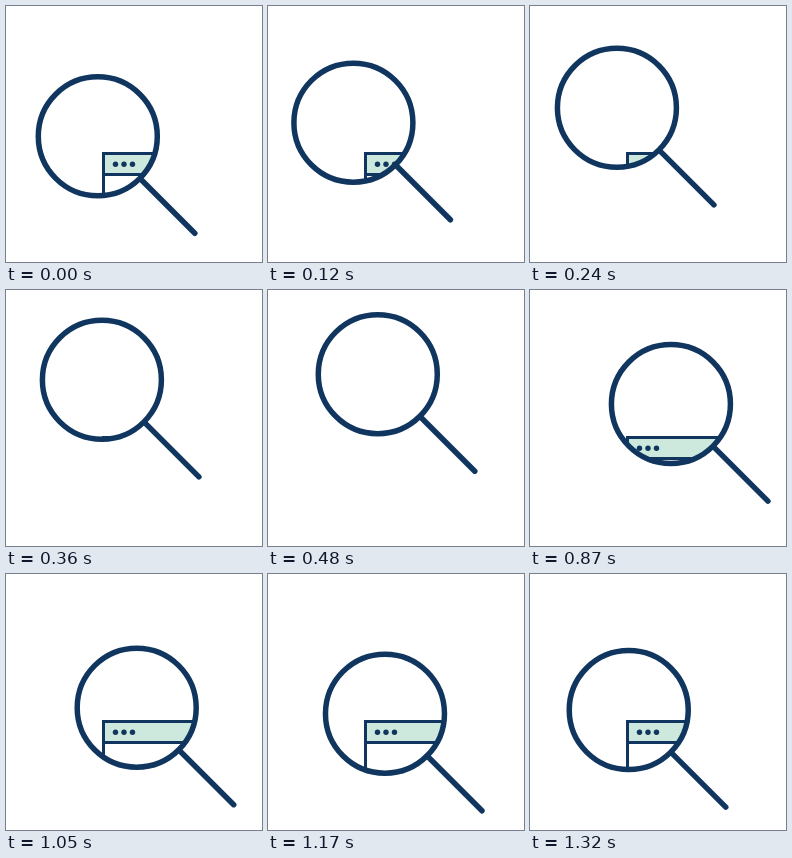
Recreate the animation shown at these times as an HTML page. Size 256 px wide and 256 px high, loop 1350 ms.

```html
<!DOCTYPE html>
<html lang="en">
<head>
<meta charset="utf-8">
<title>Searching</title>
<style>
  html, body { margin: 0; width: 100%; height: 100%; overflow: hidden; background: #fff; }
  svg { display: block; width: 100vw; height: 100vh; }
  .line { fill: none; stroke: #10365f; stroke-linecap: round; }
</style>
</head>
<body>
<svg viewBox="0 0 256 256">
  <defs>
    <clipPath id="view"><circle class="lens" r="60"/></clipPath>
  </defs>
  <g clip-path="url(#view)">
    <rect x="97.5" y="147.5" width="130" height="21" fill="#cde8dc"/>
    <path class="line" stroke-width="3" d="M97.5 240V147.5H228M97.5 168.5H228"/>
    <g fill="#10365f">
      <circle cx="109.5" cy="158.3" r="2.7"/>
      <circle cx="118" cy="158.3" r="2.7"/>
      <circle cx="126.5" cy="158.3" r="2.7"/>
    </g>
  </g>
  <g class="lens line" stroke-width="5.5">
    <circle r="59.5"/>
    <path d="M43 43L97 97"/>
  </g>
</svg>
<script>
  const LOOP = 1350;
  const CENTER = { x: 113, y: 112 };
  const ORBIT = 28;
  const START = 139;    // degrees
  const SPEED = 0.2586; // degrees per ms; just short of a full turn per loop
  const lenses = document.querySelectorAll('.lens');
  const t0 = performance.now();

  function draw(now) {
    const t = Math.max(0, now - t0) % LOOP;
    const angle = (START + SPEED * t) * Math.PI / 180;
    const x = CENTER.x + ORBIT * Math.cos(angle);
    const y = CENTER.y + ORBIT * Math.sin(angle);
    for (const el of lenses) el.setAttribute('transform', `translate(${x.toFixed(2)} ${y.toFixed(2)})`);
    requestAnimationFrame(draw);
  }
  draw(t0);
</script>
</body>
</html>
```
